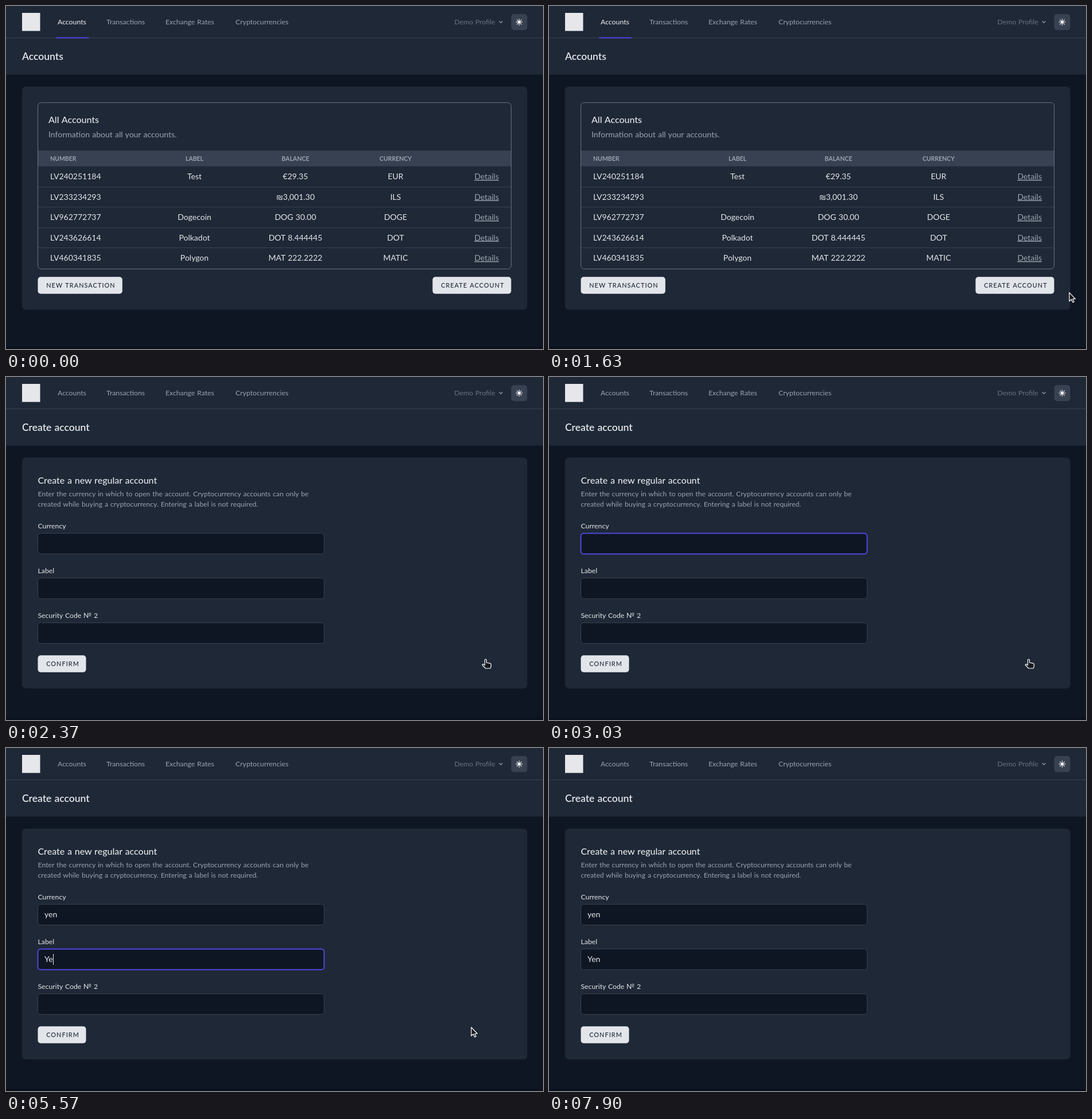
These frames come from a looping animation (936x598 px, 8000 ms). An HTML page:

```html
<!DOCTYPE html>
<html lang="en">
<head>
<meta charset="utf-8">
<title>Create account</title>
<style>
html, body { margin: 0; width: 100%; height: 100%; overflow: hidden; background: #0f1623; }
svg { display: block; width: 936px; height: 598px; font: 14px Lato, "Open Sans", sans-serif; word-spacing: .05em; }
text { fill: #e5e7eb; white-space: pre; }
.dim { fill: #9ca3af; }
.faint { fill: #6b7280; }
.small { font-size: 12.25px; }
.title { font-size: 17.5px; font-weight: 600; }
.head { font-size: 16px; font-weight: 500; }
.th { font-size: 10.5px; font-weight: 700; fill: #9ca3af; }
.btn { font-size: 10.8px; font-weight: 500; letter-spacing: 1.1px; fill: #1f2937; }
.mid { text-anchor: middle; }
.end { text-anchor: end; text-decoration: underline; }
.card { fill: #1e2836; }
.line { stroke: #374151; fill: none; }
.cursor { fill: #161a20; stroke: #fff; stroke-width: 1.2; stroke-linejoin: round; }
</style>
</head>
<body>
<svg id="stage" viewBox="0 0 936 598"></svg>
<script>
const text = (x, y, s, cls = '', id = '') => `<text id="${id}" x="${x}" y="${y}" class="${cls}">${s}</text>`;
const rect = (x, y, w, h, r = 0, attrs = 'class="card"') =>
  `<rect x="${x}" y="${y}" width="${w}" height="${h}" rx="${r}" ${attrs}/>`;
const rule = (x1, x2, y) => `<path class="line" d="M${x1} ${y}H${x2}"/>`;
const button = (x, y, w, label, id = '') =>
  rect(x, y, w, 29.5, 5, `id="${id}" fill="#e2e5ea"`) + text(x + 14.7, y + 18.5, label, 'btn');

const accounts = [
  ['LV240251184', 'Test', '€29.35', 'EUR'],
  ['LV233234293', '', '₪3,001.30', 'ILS'],
  ['LV962772737', 'Dogecoin', 'DOG 30.00', 'DOGE'],
  ['LV243626614', 'Polkadot', 'DOT 8.444445', 'DOT'],
  ['LV460341835', 'Polygon', 'MAT 222.2222', 'MATIC']
];
const row = (cells, y, cls, firstCls) => cells.map((s, i) =>
  text([77, 328.5, 504.5, 679][i], y, s, i ? cls + ' mid' : cls)).join('');

const rays = [...Array(8).keys()].map(i =>
  `<path d="M0 -4.3V-5.3" stroke="#f3f4f6" stroke-width="1.3" stroke-linecap="round" transform="rotate(${i * 45})"/>`).join('');

const frame =
  rect(0, 594, 936, 4, 0, 'fill="#0b111c"') +
  rect(0, 0, 936, 119.5) + rule(0, 936, 55.5) +
  rect(28, 12, 31.5, 31.5, 0, 'fill="#e5e7eb"') +
  text(90, 32, 'Accounts', 'small dim', 'navHome') + text(175, 32, 'Transactions', 'small dim') +
  text(278, 32, 'Exchange Rates', 'small dim') + text(400, 32, 'Cryptocurrencies', 'small dim') +
  text(781.5, 31.5, 'Demo Profile', 'small faint') +
  '<path d="M859.5 26.3l3 3 3-3" fill="none" stroke="#8b929e" stroke-width="1.5"/>' +
  rect(880.5, 14, 28, 28, 5, 'fill="#374151"') +
  `<g transform="translate(894.5 28)"><circle r="2.9" fill="#f3f4f6"/>${rays}</g>`;

const listPage =
  rect(87, 54.5, 57, 2, 0, 'fill="#4f46e5"') +
  text(28, 94, 'Accounts', 'title') +
  rect(28, 140.5, 880.5, 389, 7) +
  text(74, 204, 'All Accounts', 'head') +
  text(74, 229, 'Information about all your accounts.', 'dim') +
  rect(56, 252, 824, 27.5, 0, 'fill="#374151"') +
  row(['NUMBER', 'LABEL', 'BALANCE', 'CURRENCY'], 270, 'th') +
  accounts.map((cells, i) => {
    const y = 302 + 35.5 * i;
    return row(cells, y, '') + text(859, y, 'Details', 'dim end') +
      (i ? rule(56, 880, Math.floor(y - 22.5) + .5) : '');
  }).join('') +
  rect(55.5, 168.5, 825, 290, 6, 'fill="none" stroke="#6b7280"') +
  button(55.5, 472.3, 147.3, 'NEW TRANSACTION') +
  rect(742.5, 471.3, 139, 31.5, 6, 'id="btnRing" fill="none" stroke="#474f9c" stroke-width="1.5"') +
  button(743.5, 472.3, 137, 'CREATE ACCOUNT', 'createBtn');

const fieldTops = [272.5, 350.5, 428.5];
const formPage =
  text(28, 94, 'Create account', 'title') +
  rect(28, 140.5, 880.5, 402.5, 7) +
  text(55.5, 186, 'Create a new regular account', 'head') +
  text(55.5, 208, 'Enter the currency in which to open the account. Cryptocurrency accounts can only be', 'small dim') +
  text(55.5, 225.5, 'created while buying a cryptocurrency. Entering a label is not required.', 'small dim') +
  ['Currency', 'Label', 'Security Code №&#32;2'].map((label, i) => {
    const y = fieldTops[i];
    return text(55.5, y - 9, label, 'small') +
      rect(55.5, y, 499, 36, 5, 'fill="#0f1623" stroke="#374151"') +
      rect(55.5, y, 499, 36, 5, `id="ring${i}" fill="none" stroke="#5046e0" stroke-width="2"`) +
      text(67, y + 22.5, '', '', 'value' + i);
  }).join('') +
  rect(67, 0, 1, 19, 0, 'id="caret" fill="#e5e7eb"') +
  button(55.5, 485.3, 84, 'CONFIRM');

document.getElementById('stage').innerHTML = frame +
  `<g id="list">${listPage}</g><g id="form">${formPage}</g>
  <g id="pointer" class="cursor">
    <path id="arrow" d="M0 0V15L3.5 11.7 6 17 8.3 16 6 11H10.5Z"/>
    <path id="hand" d="M-1.5 1.5a1.5 1.5 0 0 1 3 0V6l6 1.2q2 .4 2 2.3v3l-1.5 3.5h-8L-5.5 10.5q-.8-1.3 .5-1.8 1-.2 2 .8l1.5 1Z"/>
  </g>`;

const $ = id => document.getElementById(id);
const show = (id, on) => $(id).style.display = on ? '' : 'none';
const clamp = v => Math.min(1, Math.max(0, v));
const fade = (t, on, off) => clamp((t - on) / 120) * clamp(1 - (t - off) / 120);

// Pointer path: time, x, y
const path = [[1530, 919, 501], [1950, 836, 492], [3600, 836, 492], [3900, 826, 492],
  [4070, 826, 492], [4300, 811, 487], [6700, 811, 487], [6870, 806, 604]];
// Focused fields: start, end, key times
const fields = [
  { text: 'yen', on: 2430, off: 4230, keys: [3200, 3460, 3700] },
  { text: 'Yen', on: 4270, off: 7490, keys: [5200, 5430, 5670] }
];
const pageChange = 2370, click = 2080, blink = 600;

function pointerAt(t) {
  const i = path.findIndex(p => t < p[0]);
  if (i < 1) return null;
  const [t0, x0, y0] = path[i - 1], [t1, x1, y1] = path[i];
  const u = (t - t0) / (t1 - t0), e = u * u * (3 - 2 * u);
  return [x0 + (x1 - x0) * e, y0 + (y1 - y0) * e];
}

function draw(t) {
  const onForm = t >= pageChange;
  show('list', !onForm);
  show('form', onForm);
  $('navHome').style.fill = onForm ? '#9ca3af' : '#f3f4f6';

  const pos = pointerAt(t);
  show('pointer', pos);
  if (pos) $('pointer').setAttribute('transform', `translate(${pos})`);
  const overButton = pos && pos[0] < 880;
  const isHand = overButton && t < 3600;
  show('hand', isHand);
  show('arrow', !isHand);
  $('createBtn').setAttribute('fill', overButton ? '#eff0f4' : '#e2e5ea');
  $('btnRing').style.opacity = fade(t, click - 60, 9000);

  let caretOn = false;
  fields.forEach((f, i) => {
    const typed = f.keys.filter(k => t >= k).length;
    const value = $('value' + i);
    value.textContent = f.text.slice(0, typed);
    $('ring' + i).style.opacity = fade(t, f.on - (i ? 40 : 0), f.off);
    if (t < f.on || t >= f.off) return;
    const since = t - (typed ? f.keys[typed - 1] : f.on);
    caretOn = Math.floor(since / blink) % 2 === 0;
    const width = typed ? value.getComputedTextLength() : 0;
    $('caret').setAttribute('x', 67 + Math.round(width));
    $('caret').setAttribute('y', fieldTops[i] + 8.5);
  });
  $('ring2').style.opacity = 0;
  show('caret', caretOn);
}

function tick() {
  draw(performance.now() % 8000);
  requestAnimationFrame(tick);
}
tick();
</script>
</body>
</html>
```
